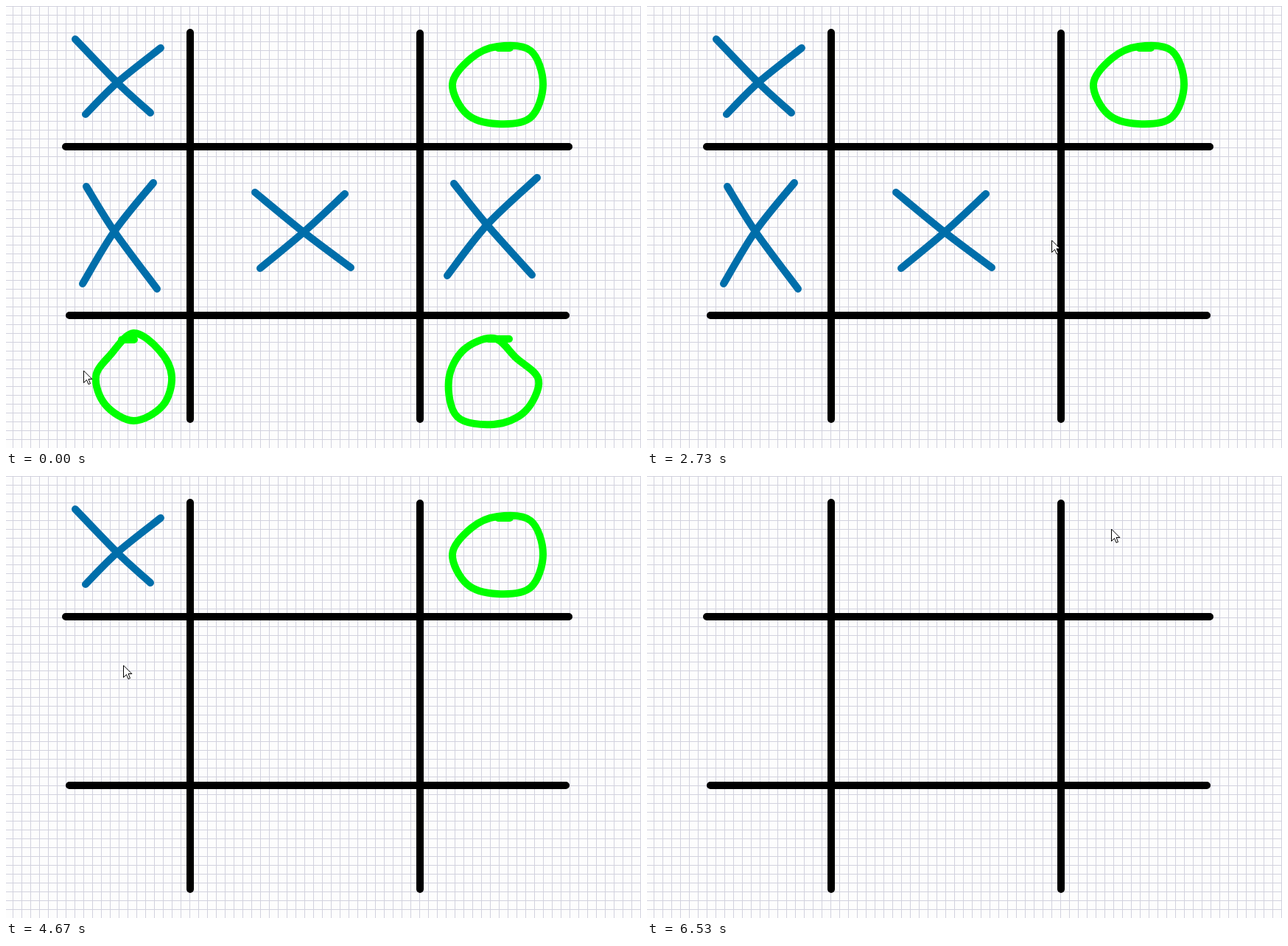
Animation of 862x600 px, one loop 6.56 s. Source, as an HTML page with a canvas:

```html
<!DOCTYPE html>
<html lang="en">
<head>
<meta charset="utf-8">
<title>Noughts and crosses</title>
<style>
  html, body { margin: 0; width: 100%; height: 100%; overflow: hidden; background: #fdfdfd; }
  canvas { display: block; }
</style>
</head>
<body>
<canvas id="stage" width="862" height="600"></canvas>
<script>
const LOOP = 6560;
const LAST = 6530;
const FRAME = 100 / 3;
const W = 862, H = 600, CELL = 12;
const ctx = document.getElementById('stage').getContext('2d');

// A smooth curve through a few points, open or closed.
function curve(pts, closed) {
  const n = pts.length;
  const at = i => closed ? pts[(i + n) % n] : pts[Math.max(0, Math.min(n - 1, i))];
  const path = new Path2D();
  path.moveTo(...pts[0]);
  for (let i = 0; i < (closed ? n : n - 1); i++) {
    const p = at(i - 1), a = at(i), b = at(i + 1), q = at(i + 2);
    path.bezierCurveTo(
      a[0] + (b[0] - p[0]) / 6, a[1] + (b[1] - p[1]) / 6,
      b[0] - (q[0] - a[0]) / 6, b[1] - (q[1] - a[1]) / 6, ...b);
  }
  return path;
}

// Two strokes that meet in the middle; each is rubbed out at its own time.
function cross(mid, [tl, br], [bl, tr], goneDown, goneUp) {
  const color = '#006eaa';
  return [
    { color, gone: goneDown, path: curve([tl, mid, br]) },
    { color, gone: goneUp, path: curve([bl, mid, tr]) }
  ];
}

// A wobbly ring from its radii, clockwise from the top, with a short tail.
function ring([cx, cy], radii, tail, gone) {
  const pts = radii.map((r, i) => {
    const a = i / radii.length * 2 * Math.PI;
    return [cx + r * Math.sin(a), cy - r * Math.cos(a)];
  });
  const path = curve(pts, true);
  path.addPath(curve(tail));
  return [{ color: '#00ff00', gone, path }];
}

const marks = [
  ring([173, 503], [59, 50, 52, 56, 60, 54, 51, 43], [[157, 453], [174, 453]], 200),
  ring([662, 508], [57, 43, 61, 60, 60, 70, 61, 58], [[683, 452], [655, 452]], 1070),
  cross([653, 297], [[608, 241], [714, 365]], [[599, 366], [721, 233]], 1870, 2170),
  cross([404, 307], [[338, 253], [468, 355]], [[345, 356], [460, 255]], 3130, 3370),
  cross([147, 306], [[109, 245], [205, 384]], [[104, 377], [200, 240]], 4400, 4130),
  cross([151, 104], [[94, 45], [196, 145]], [[108, 147], [210, 57]], 5130, 5370),
  ring([667, 106], [51, 64, 62, 64, 54, 58, 61, 50], [[684, 57], [668, 57]], 6430)
].flat();

// Where the pointer turns: time, x, y
const turns = [
  [0, 105, 495], [970, 620, 574], [2000, 688, 309], [3130, 455, 338],
  [3230, 440, 321], [3370, 410, 306], [4000, 143, 376], [4400, 150, 312],
  [5230, 174, 136], [5370, 155, 108], [LAST, 630, 72]
];

function speed(i, c) {
  const a = turns[i - 1], b = turns[i + 1];
  return a && b ? (b[c] - a[c]) / (b[0] - a[0]) : 0;
}

function pointerAt(t) {
  const i = Math.max(0, turns.findIndex(k => k[0] >= t) - 1);
  const a = turns[i], b = turns[i + 1];
  const span = b[0] - a[0];
  const u = (t - a[0]) / span, v = 1 - u;
  return [1, 2].map(c => Math.round(
    v * v * (1 + 2 * u) * a[c] + u * u * (1 + 2 * v) * b[c] +
    u * v * span * (v * speed(i, c) - u * speed(i + 1, c))
  ));
}

function drawGrid() {
  ctx.fillStyle = '#fdfdfd';
  ctx.fillRect(0, 0, W, H);
  ctx.fillStyle = '#d2d2de';
  for (let x = 9; x < W; x += CELL) ctx.fillRect(x, 0, 1, H);
  for (let y = 0; y < H; y += CELL) ctx.fillRect(0, y, W, 1);
}

function drawStroke(path, color) {
  ctx.strokeStyle = color;
  ctx.lineWidth = 10;
  ctx.lineCap = ctx.lineJoin = 'round';
  ctx.stroke(path);
}

const board = new Path2D('M250 36V561M562 37V561M81 191H764M86 420H760');
const arrow = new Path2D('M.5 .5V16.5L4.5 12.5L7 18.5L9.5 17.5L7 11.5H11.5Z');

function drawPointer([x, y]) {
  ctx.save();
  ctx.translate(x, y);
  ctx.fillStyle = '#fff';
  ctx.strokeStyle = '#000';
  ctx.lineWidth = 1;
  ctx.lineJoin = 'miter';
  ctx.fill(arrow);
  ctx.stroke(arrow);
  ctx.restore();
}

// Hold each picture for a thirtieth of a second, on a 10 ms clock.
function snap(t) {
  const at = k => Math.round(k * FRAME / 10) * 10;
  let k = Math.floor(t / FRAME) + 1;
  while (at(k) > t) k--;
  return Math.min(at(k), LAST);
}

function draw(t) {
  drawGrid();
  drawStroke(board, '#000');
  for (const m of marks) if (t < m.gone) drawStroke(m.path, m.color);
  drawPointer(pointerAt(t));
}

const start = performance.now();
function tick() {
  draw(snap((performance.now() - start) % LOOP));
  requestAnimationFrame(tick);
}
tick();
</script>
</body>
</html>
```
